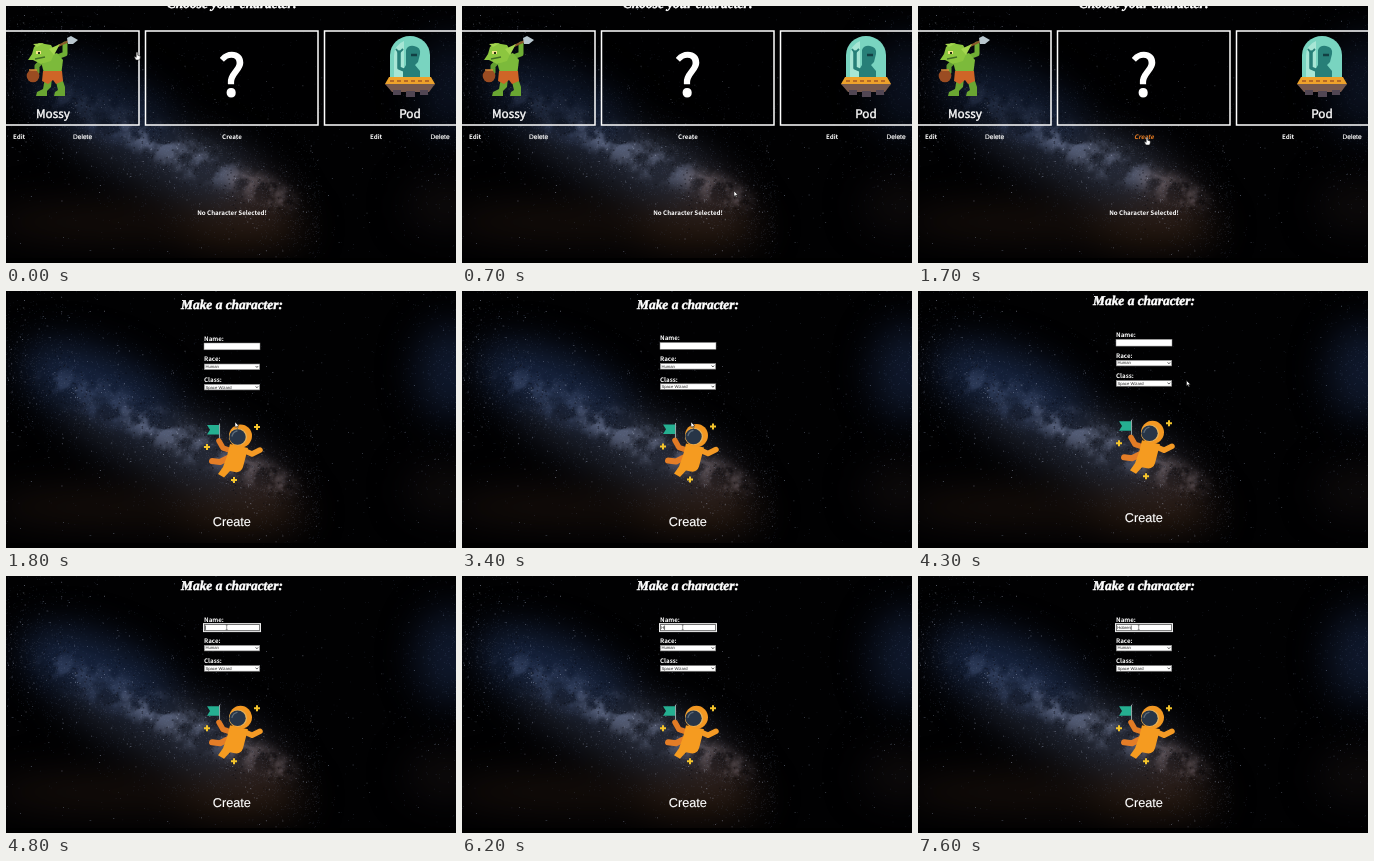
Recreate the animation shown at these times as an HTML page. Size 450 by 257 pixels, loop 8 s.

```html
<!DOCTYPE html>
<html lang="en">
<head>
<meta charset="utf-8">
<title>Character maker</title>
<style>
  html, body { margin: 0; height: 100%; overflow: hidden; background: #000; }
  svg { display: block; width: 100vw; height: 100vh; }
  filter { color-interpolation-filters: sRGB; }
  text { fill: #fff; text-rendering: geometricPrecision; white-space: pre; }
  .title { font: italic bold 13.4px "Liberation Serif", serif; text-anchor: middle; stroke: #fff; stroke-width: .5; }
  .label { font: bold 6.2px "Noto Sans CJK JP", "Noto Sans CJK", "Noto Sans", sans-serif; }
  .name { font: 500 11.8px "Noto Sans CJK JP", "Noto Sans CJK", "Noto Sans", sans-serif; stroke: #fff; stroke-width: .4; }
  .mark { font-size: 57px; stroke-width: 1.6; }
  .button { font: 6.6px "Liberation Sans", Arial, sans-serif; stroke: #fff; stroke-width: .15; }
  .big { font-size: 12.7px; }
  .field { font: 4.2px "Liberation Sans", Arial, sans-serif; fill: #222; }
  .mid { text-anchor: middle; }
  .hover { fill: #f08022; font-style: italic; }
  .card { fill: #000; fill-opacity: .3; stroke: #fff; stroke-width: 1.5; }
  .limb { fill: none; stroke-linecap: round; stroke-linejoin: round; }
</style>
</head>
<body>
<svg viewBox="0 0 450 257" preserveAspectRatio="none">
  <defs>
    <filter id="soft" x="-60%" y="-60%" width="220%" height="220%"><feGaussianBlur stdDeviation="18"/></filter>
    <filter id="cloud" x="-20%" y="-80%" width="140%" height="260%">
      <feGaussianBlur stdDeviation="6" result="glow"/>
      <feTurbulence type="fractalNoise" baseFrequency=".05" numOctaves="5" seed="4"/>
      <feColorMatrix values="0 0 0 0 0  0 0 0 0 0  0 0 0 0 0  4 0 0 0 -1.5" result="holes"/>
      <feComposite in="glow" in2="holes" operator="in"/>
    </filter>
    <path id="plus" d="M-3,0H3M0,-3V3" stroke="#f5c52c" stroke-width="2"/>
    <g id="select">
      <rect x=".3" y=".3" width="55.4" height="5.6" fill="#fff" stroke="#888" stroke-width=".6"/>
      <path d="M51.6,2.3l1.3,1.5 1.3,-1.5" fill="none" stroke="#222" stroke-width=".7"/>
    </g>
  </defs>

  <!-- night sky -->
  <rect width="450" height="257" fill="#010102"/>
  <g filter="url(#soft)">
    <ellipse cx="130" cy="216" rx="150" ry="20" fill="#140d0a"/>
    <ellipse cx="235" cy="222" rx="65" ry="20" fill="#26180f"/>
    <g transform="translate(160 139) rotate(24)">
      <ellipse cx="-75" cy="-10" rx="85" ry="36" fill="#15223d"/>
      <ellipse cx="-5" cy="22" rx="100" ry="22" fill="#1c202c"/>
      <ellipse cx="50" cy="0" rx="65" ry="24" fill="#272c3a"/>
      <ellipse cx="105" cy="8" rx="32" ry="16" fill="#32282a"/>
    </g>
    <ellipse cx="446" cy="80" rx="36" ry="48" fill="#0f182c"/>
    <ellipse cx="440" cy="200" rx="40" ry="25" fill="#0d0a0b"/>
  </g>
  <g transform="translate(160 139) rotate(24)" filter="url(#cloud)">
    <ellipse cx="-65" cy="0" rx="75" ry="17" fill="#3b4a6b" opacity=".6"/>
    <ellipse cx="20" cy="2" rx="70" ry="16" fill="#6d7690" opacity=".6"/>
    <ellipse cx="105" cy="2" rx="35" ry="11" fill="#84757a" opacity=".6"/>
  </g>
  <g id="stars"></g>
  <rect y="252" width="450" height="5" fill="#000" opacity=".85"/>

  <!-- character list -->
  <g id="list">
    <text class="title" x="226" y="2">Choose your character:</text>
    <rect class="card" x="-40" y="25" width="173" height="94"/>
    <rect class="card" x="139.5" y="25" width="172.5" height="94"/>
    <rect class="card" x="318.5" y="25" width="173" height="94"/>

    <g id="goblin">
      <path class="limb" d="M51,51L59,48 59,38" stroke="#6fae35" stroke-width="5"/>
      <path d="M52,40L65,34" stroke="#8b5a2b" stroke-width="2"/>
      <path d="M61,32L65,30 72,34 67,38 62,38Z" fill="#b9c7cf"/>
      <path d="M34,52L51,47 57,54 55,70 39,71Z" fill="#7cba3b"/>
      <path class="limb" d="M37,54L31,60 31,66" stroke="#629d30" stroke-width="5"/>
      <path d="M39,72h7l-1,9 -4,4v5h-11l1,-4 6,-3ZM49,72h7l3,9v9h-11l1,-4 3,-2Z" fill="#6aa632"/>
      <path d="M37,65H56L57,75 50,78 47,74 42,78 36,75Z" fill="#cf6527"/>
      <path d="M28,41L33,37 45,39 49,46 45,55 35,58 27,54 22,54 26,48Z" fill="#8cc63f"/>
      <path d="M31,41L27,38 38,37ZM43,43L54,38 48,49Z" fill="#a5d750"/>
      <path d="M30,45h5v3h-5z" fill="#f6e58a"/>
      <path d="M32,46h2v2h-2z" fill="#263315"/>
      <path d="M29,53L39,51" stroke="#426f25" stroke-width="1.4"/>
      <circle cx="27" cy="70" r="6.3" fill="#9a4c22"/>
      <path d="M23,64h8" stroke="#d38a3a" stroke-width="1.5"/>
    </g>
    <text class="name mid" x="47" y="112">Mossy</text>
    <text class="label" x="7" y="133">Edit</text>
    <text class="button" x="67" y="132.5">Delete</text>

    <text class="name mark mid" x="226" y="90">?</text>
    <text id="create" class="label mid" x="226" y="133">Create</text>

    <g id="saucer">
      <path d="M384,74V49a20,19 0 0 1 40,0V74Z" fill="#79d4c0"/>
      <path d="M388,73V50a16,15 0 0 1 10,-15V73Z" fill="#a7e6d5"/>
      <path d="M397,75V64l3,-5V44q2,-5 8,-4q7,1 6,8l-2,8 -3,3 5,6v10Z" fill="#277f78"/>
      <path class="limb" d="M400,65L393,62 393,46" stroke="#277f78" stroke-width="3.5"/>
      <path d="M390,43l3,4 4,-4" fill="none" stroke="#277f78" stroke-width="1.8"/>
      <path d="M405,49h6" stroke="#123f43" stroke-width="2.5"/>
      <path d="M383,71H425L429,78 418,83H390L379,78Z" fill="#eea22b"/>
      <path d="M379,78H429L423,86H386Z" fill="#77594e"/>
      <path d="M384,75H424" stroke="#b66a25" stroke-width="2" stroke-dasharray="4 3"/>
      <path d="M387,84h8v5h-8zM400,85h9v6h-9zM414,84h8v5h-8z" fill="#514653"/>
    </g>
    <text class="name mid" x="404" y="112">Pod</text>
    <text class="label" x="364" y="133">Edit</text>
    <text class="button" x="424.5" y="132.5">Delete</text>
    <text class="label mid" x="226" y="209.3">No Character Selected!</text>
  </g>

  <!-- character form -->
  <g id="form">
    <text class="title" x="226" y="18.2">Make a character:</text>
    <text class="label" x="198" y="49.6">Name:</text>
    <rect x="198" y="52" width="56" height="6.8" fill="#fff" stroke="#888" stroke-width=".5"/>
    <g id="focus" fill="none">
      <rect x="197.5" y="51.3" width="57" height="8" stroke="#eee"/>
      <rect x="198.5" y="52.3" width="55" height="6" stroke="#666" stroke-width=".8"/>
    </g>
    <text id="typed" class="field" x="199.2" y="57"></text>
    <path id="caret" d="M0,53.2v4.4" stroke="#111" stroke-width=".6"/>
    <text class="label" x="198" y="70.4">Race:</text>
    <use href="#select" x="198" y="72.7"/>
    <text class="field" x="199.4" y="77.2">Human</text>
    <text class="label" x="198" y="91">Class:</text>
    <use href="#select" x="198" y="93"/>
    <text class="field" x="199.4" y="97.5">Space Wizard</text>

    <g id="astronaut">
      <path d="M213.5,132.5V153" stroke="#91a4a5" stroke-width="1.1"/>
      <path d="M201,134H213V143.5H201L204,138.7Z" fill="#25af91"/>
      <path class="limb" d="M226,160L217,157 213,150" stroke="#e27b25" stroke-width="5.5"/>
      <path class="limb" d="M237,159L246,163 254,159" stroke="#f49a25" stroke-width="5.5"/>
      <path class="limb" d="M222,167L214,171 206,170" stroke="#e47d27" stroke-width="6"/>
      <path d="M224,153L242,157 237,176Q235,182 229,181L224,180 218,186.5 212,183 217,176 221,165Z" fill="#f59b20"/>
      <circle cx="234.5" cy="145" r="11.5" fill="#f39822"/>
      <ellipse cx="232" cy="146" rx="9" ry="8.5" fill="#e6b25a"/>
      <ellipse cx="231.5" cy="146" rx="8.2" ry="7.8" fill="#273547"/>
      <path d="M226,145q1,-4 5,-5" class="limb" stroke="#5b6b7a" stroke-width="1.3"/>
      <use href="#plus" x="251" y="136"/>
      <use href="#plus" x="201" y="156"/>
      <use href="#plus" x="228" y="189"/>
    </g>
    <text class="button big mid" x="225.8" y="235.2">Create</text>
  </g>

  <g id="pointer" stroke="#111" stroke-width=".5" fill="#fff">
    <path id="hand" d="M-.8,.5Q0,-.5.8,.5V3.2L3.3,4V6L2.5,8H-1L-2.8,5 -2,4.5 -.8,5.4Z"/>
    <path id="arrow" d="M0,0V5.4L1.3,4.3 2.2,6.3 3,5.9 2.1,4 3.9,3.9Z"/>
    <path id="beam" d="M-1,-2.4H1M0,-2.4V2.4M-1,2.4H1" stroke="#333"/>
  </g>
</svg>
<script>
const LOOP = 8000, NAME = "Hobren";
const KEY_TIMES = [6200, 6500, 6800, 7400, 7600, 7600];
// time, x, y of the pointer tip
const PATH = [
  [0, 131, 46], [300, 55, 120], [500, 130, 200], [700, 272, 185], [900, 231, 135],
  [1200, 229, 131], [3900, 229, 131], [4200, 275, 157], [4400, 262, 22], [4600, 220.7, 51.3], [LOOP, 220.7, 51.3]
];
const $ = id => document.getElementById(id);
const show = (id, on) => { $(id).style.display = on ? "" : "none"; };

let seed = 7;
const rand = () => (seed = seed * 16807 % 2147483647) / 2147483647;
const bell = () => rand() + rand() + rand() - 1.5;

function scatter(count, size, color, opacity, place) {
  let d = "";
  for (let i = 0; i < count; i++) {
    const [x, y] = place();
    d += `M${x.toFixed(1)},${y.toFixed(1)}h${size}v${size}h-${size}z`;
  }
  $("stars").insertAdjacentHTML("beforeend", `<path d="${d}" fill="${color}" opacity="${opacity}"/>`);
}
const anywhere = () => [rand() * 450, rand() * 252];
const around = spread => () => {
  const x = rand() * 315;
  return [x, 67 + x * .45 + bell() * spread];
};
const rightSide = () => [450 - Math.abs(bell()) * 75, 95 + bell() * 110];
scatter(350, .6, "#8fa3c8", .3, anywhere);
scatter(90, .8, "#b5c5e5", .45, anywhere);
scatter(2600, .7, "#7f95c4", .2, around(95));
scatter(1300, .7, "#a3a6b4", .22, around(45));
scatter(300, 1.4, "#05060b", .4, around(40));
scatter(150, .9, "#c5cfe6", .45, around(100));
scatter(450, .7, "#7f95c4", .22, rightSide);

function pointerAt(t) {
  const i = PATH.findIndex(p => p[0] > t);
  const [t0, x0, y0] = PATH[i - 1], [t1, x1, y1] = PATH[i];
  const k = (t - t0) / (t1 - t0);
  return [x0 + (x1 - x0) * k, y0 + (y1 - y0) * k];
}

function draw(now) {
  const t = Math.floor(now % LOOP / 100) * 100;
  const form = t >= 1800;
  show("list", !form);
  show("form", form);

  const [x, y] = pointerAt(t);
  const overCreate = !form && t >= 900;
  const overField = t >= 4600;
  const hand = !form && (overCreate || y < 119);
  $("pointer").setAttribute("transform", `translate(${x} ${y})`);
  show("hand", hand);
  show("beam", overField);
  show("arrow", !hand && !overField);
  $("create").classList.toggle("hover", overCreate);

  if (form) {
    const scroll = t < 3400 ? 0 : t < 3500 ? .5 : t < 3600 ? 2.5 : 3.7;
    $("form").setAttribute("transform", `translate(0 ${-scroll})`);
    show("focus", t >= 4800);
    const typed = $("typed");
    typed.textContent = NAME.slice(0, KEY_TIMES.filter(k => t >= k).length);
    show("caret", t >= 4800 && (t < 5400 || t >= 6000));
    const end = typed.textContent ? typed.getComputedTextLength() : 0;
    $("caret").setAttribute("transform", `translate(${199.5 + end} 0)`);
  }
  requestAnimationFrame(draw);
}
draw(performance.now());
</script>
</body>
</html>
```
